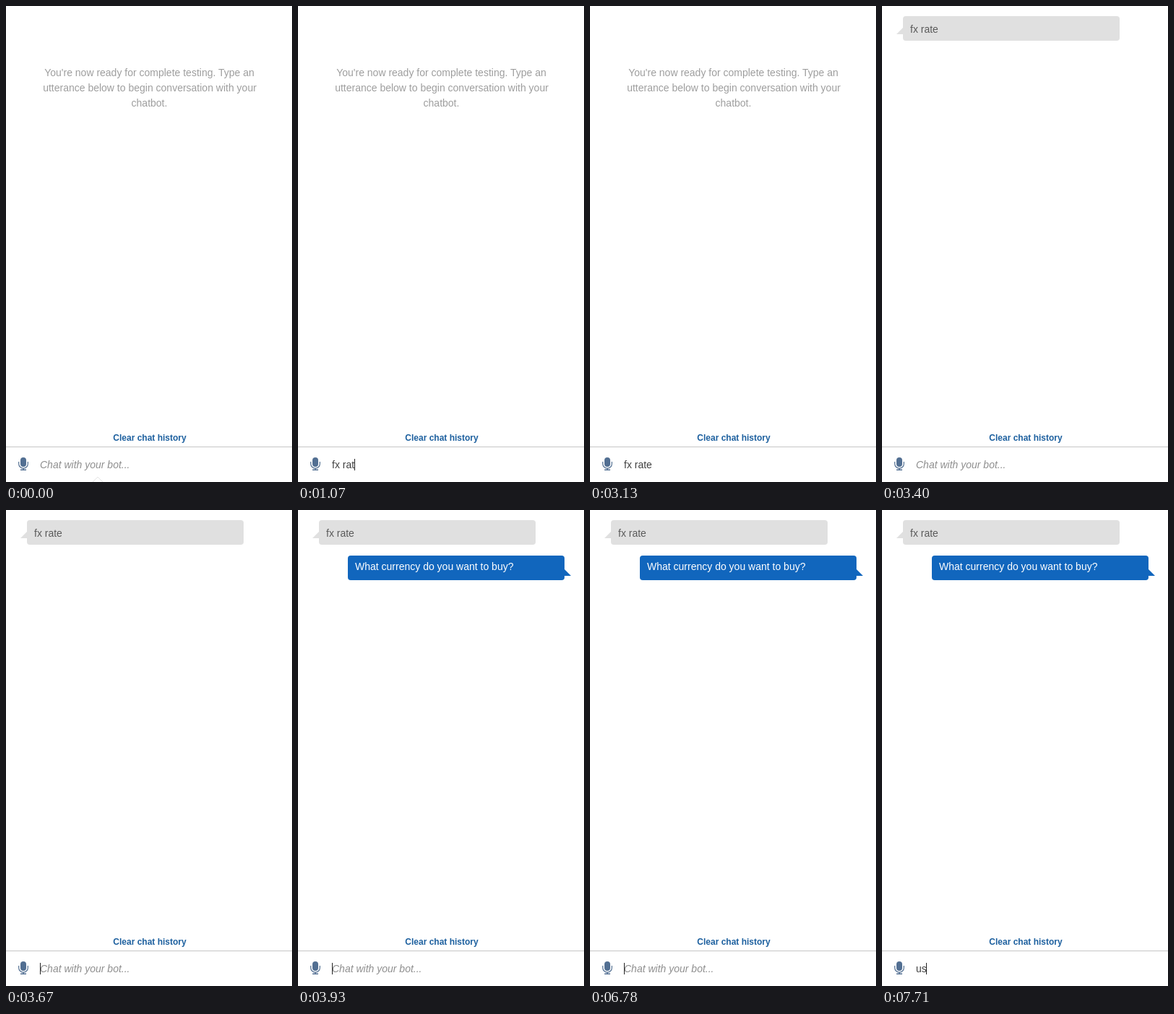
These frames come from a looping animation (396 px wide and 658 px high, 8 s). An HTML page:

```html
<!DOCTYPE html>
<html lang="en">
<head>
<meta charset="utf-8">
<title>Chat test</title>
<style>
  html, body { margin: 0; width: 100%; height: 100%; overflow: hidden; background: #fff; }
  svg { display: block; width: 396px; height: 658px; }
  text { font: 14px "Liberation Sans", Arial, sans-serif; white-space: pre; }
  .hint { fill: #9e9e9e; text-anchor: middle; }
  .clear { font-size: 12px; font-weight: bold; fill: #1d609f; text-anchor: middle; }
  .placeholder { font-style: italic; fill: #8f8f8f; }
</style>
</head>
<body>
<svg viewBox="0 0 396 658">
  <g id="intro" class="hint">
    <text x="198.5" y="97">You're now ready for complete testing. Type an</text>
    <text x="199" y="118">utterance below to begin conversation with your</text>
    <text x="198.5" y="139">chatbot.</text>
  </g>

  <g id="question">
    <rect x="29" y="14" width="300" height="34" rx="4" fill="#e0e0e0"/>
    <path d="M29 30L20 39H29Z" fill="#e0e0e0"/>
    <text x="39" y="37" fill="#5a5a5a">fx rate</text>
  </g>

  <g id="reply">
    <rect x="69" y="63" width="300" height="34" rx="4" fill="#1166bd"/>
    <path d="M369 82L378 91H369Z" fill="#1166bd"/>
    <text x="79" y="83" fill="#fff">What currency do you want to buy?</text>
  </g>

  <text class="clear" x="199" y="601">Clear chat history</text>
  <rect y="609" width="396" height="1" fill="#c6c6c6"/>

  <g fill="none" stroke="#526f92">
    <rect x="20" y="624" width="8" height="13" rx="4" fill="#526f92" stroke="none"/>
    <path d="M17.7 630V633A6.3 6 0 0 0 30.3 633V630" stroke-width="1.2"/>
    <path d="M24 639V641M20 641.3H28" stroke-width="1.5"/>
  </g>

  <text id="placeholder" class="placeholder" x="47" y="639">Chat with your bot...</text>
  <text id="entry" x="47" y="639" fill="#404040"></text>
  <rect id="caret" y="626" width="1" height="16" fill="#222" shape-rendering="crispEdges"/>
  <path id="peak" d="M120 658L127 651L134 658" fill="none" stroke="#e4e4e4"/>
</svg>
<script>
  const LOOP = 8000, SENT = 3400, REPLIED = 3930, PEAK_END = 140;

  // [start ms, typed text, caret x or 0 when hidden]
  const steps = [
    [0, "", 0],
    [70, "f", 50],
    [350, "fx", 57],
    [610, "fx ", 61],
    [740, "fx r", 66],
    [940, "fx ra", 74],
    [1070, "fx rat", 78],
    [1540, "fx rater", 91],
    [2070, "fx rate", 0],
    [2600, "fx rate", 85],
    [3130, "fx rate", 0],
    [SENT, "", 0],
    [3670, "", 47],
    [4200, "", 0],
    [4730, "", 47],
    [5190, "", 0],
    [5790, "", 47],
    [6250, "", 0],
    [6780, "", 47],
    [7310, "u", 54],
    [7710, "us", 61]
  ];

  const el = id => document.getElementById(id);
  const show = (id, on) => el(id).setAttribute("visibility", on ? "visible" : "hidden");

  function draw(t) {
    const [, typed, caretX] = steps.findLast(step => step[0] <= t);
    show("intro", t < SENT);
    show("question", t >= SENT);
    show("reply", t >= REPLIED);
    show("peak", t < PEAK_END);
    show("placeholder", !typed);
    show("caret", caretX > 0);
    el("entry").textContent = typed;
    el("caret").setAttribute("x", caretX);
  }

  const start = performance.now();
  function tick() {
    draw((performance.now() - start) % LOOP);
    requestAnimationFrame(tick);
  }
  tick();
</script>
</body>
</html>
```
